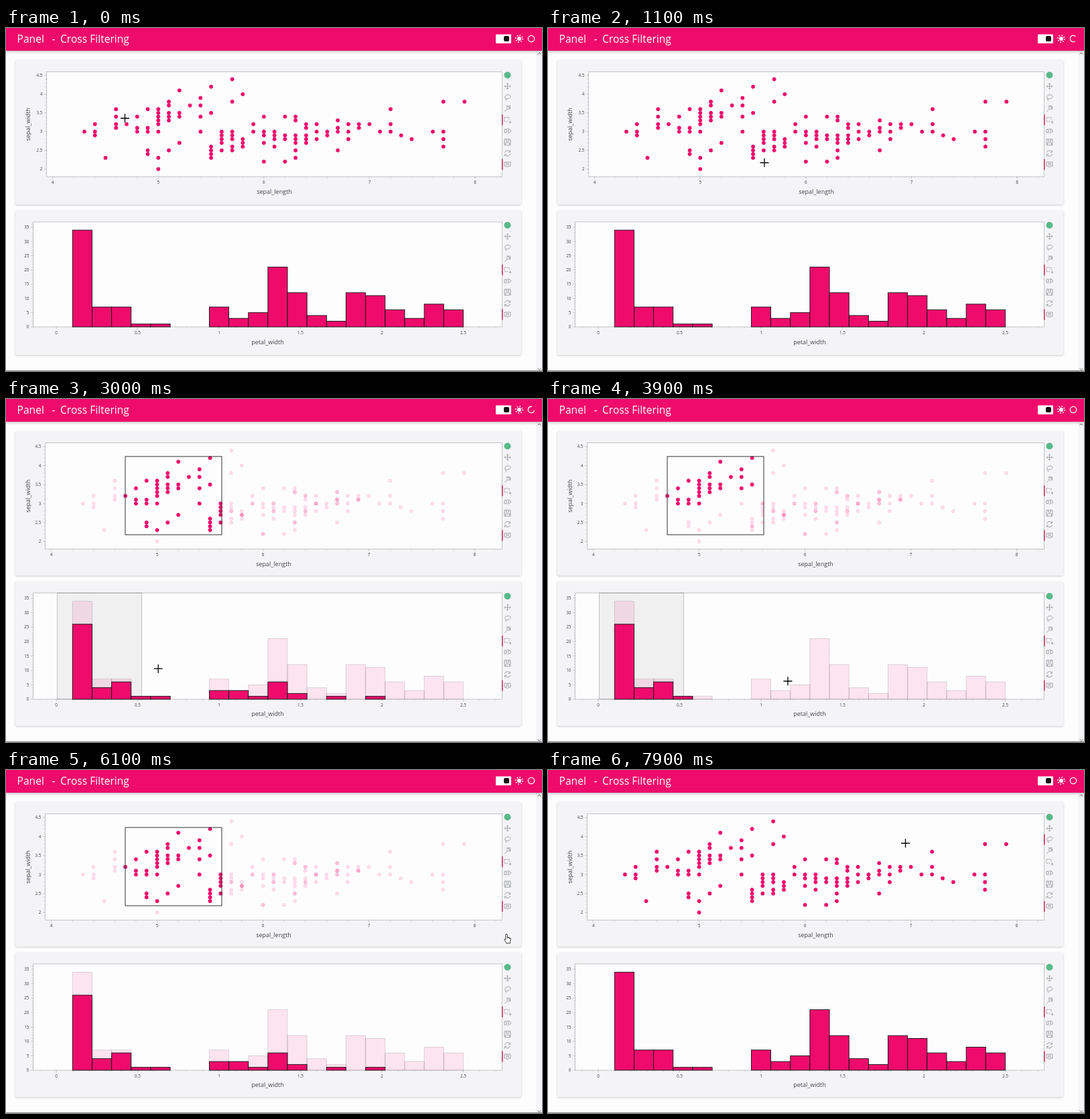
Animation, 800 px wide and 513 px high, one loop 8000 ms. Source, as an HTML page:

```html
<!DOCTYPE html>
<html lang="en">
<head>
<meta charset="utf-8">
<title>Cross Filtering</title>
<style>
html, body { margin: 0; width: 100%; height: 100%; overflow: hidden; background: #fdfdfe; }
svg { display: block; width: 800px; height: 513px; font-family: "Open Sans", "Noto Sans", sans-serif; }
.card { fill: #f4f3f6; filter: drop-shadow(0 1px 1.5px rgba(0, 0, 0, .2)); }
.tick { font-size: 6.4px; fill: #444; }
.label { font-size: 9px; fill: #444; text-anchor: middle; }
.axis { stroke: #c4c4c6; fill: none; }
.icon { stroke: #a3a5a8; fill: none; stroke-width: 1; }
</style>
</head>
<body>
<svg id="stage" viewBox="0 0 800 513">
  <rect width="800" height="513" fill="#fdfdfe"/>
  <rect x="791" y="34" width="9" height="479" fill="#f5f4f6"/>
  <path d="M793.5 39.5l2.5-2.5 2.5 2.5M793.5 509l2.5 2.5 2.5-2.5" fill="none" stroke="#666"/>
  <path d="M0 512.5H800" stroke="#8a8a8c"/>
  <rect width="800" height="34" fill="#ef0b6b" style="filter:drop-shadow(0 1px 2px rgba(0,0,0,.3))"/>
  <g font-size="15.6" fill="#fff">
    <text x="16.5" y="22">Panel</text><text x="68.5" y="22">-</text><text x="81" y="22">Cross Filtering</text>
  </g>
  <rect x="731" y="9.500" width="23" height="13.500" rx="1" fill="#fff"/>
  <rect x="743" y="12" width="8" height="8" rx="2" fill="#111"/>
  <circle cx="766" cy="16" r="3" fill="#fff"/>
  <circle cx="766" cy="16" r="5" fill="none" stroke="#fff" stroke-width="2" stroke-dasharray="1.4 2.527"/>
  <g id="busy"></g>
  <rect class="card" x="14" y="48" width="755" height="216" rx="2"/>
  <rect class="card" x="14" y="273" width="755" height="216" rx="2"/>
  <g id="plots"></g>
  <g id="tools"></g>
  <g id="pointer"></g>
</svg>
<script>
const PINK = '#ee0b6c';
const LOOP = 8000, STEP = 100;
const $ = id => document.getElementById(id);
const range = (a, b, s = 1) => Array.from({ length: Math.round((b - a) / s) + 1 }, (_, i) => a + i * s);
const within = (t, a, b) => t >= a && t < b;

// Sepal widths for each sepal length, in tenths, starting at 4.3.
const columns = [
  [30], [29, 30, 32], [23], [31, 32, 34, 36], [32], [30, 31, 34], [24, 25, 30, 31, 36],
  [20, 23, 30, ...range(32, 36)], [25, ...range(33, 35), 37, 38], [27, 34, 35, 41], [37],
  [30, 34, 37, 39], [...range(23, 26), 35, 42], [25, ...range(27, 30)],
  [25, 26, ...range(28, 30), 38, 44], [...range(26, 28), 40], [30, 32], [22, 27, 29, 30, 34],
  [26, ...range(28, 30)], [22, 28, 29, 34], [23, 25, ...range(27, 29), 33, 34],
  [...range(27, 29), 31, 32], [28, 30, 32], [29, 30], [25, 30, 31, 33], [28, 30, 32],
  [31, 32], [32], [30], [30, 32, 36], [29], [28], [], [30], [26, 28, 30, 38], [], [38]
];
const repeats = {
  2: '55,24 56,30 57,28 59,30 60,22 61,28 61,30 63,25 63,33 64,28 64,32 67,30 67,33',
  3: '65,30 67,31 69,31',
  4: '58,27'
};
const copies = key => +(Object.keys(repeats).find(n => repeats[n].split(' ').includes(key)) || 1);
const points = columns.flatMap((ys, i) => ys.map(y => ({ x: 43 + i, y, n: copies(`${43 + i},${y}`) })));

const counts = [34, 7, 7, 1, 1, 0, 0, 7, 3, 5, 21, 12, 4, 2, 12, 11, 6, 3, 8, 6];
const boxCounts = [26, 4, 6, 1, 1, 0, 0, 3, 3, 1, 6, 2, 0, 1, 0, 1, 0, 0, 0, 0];

const inBox = p => p.x >= 47 && p.x <= 56 && p.y >= 22 && p.y <= 42;
const inBoth = p => inBox(p) && (p.y > 30 || (p.y === 30 && p.x < 52));

// Pointer stops: time, x, y.
const stops = [
  [0, 177.5, 135], [300, 178, 86], [900, 322, 203], [1000, 323, 201.5], [1800, 323, 201.5],
  [2300, 77, 314], [2500, 77, 314], [2800, 203, 400], [3600, 358, 422], [4400, 358, 422],
  [5100, 747, 408], [5300, 747, 411], [5700, 747, 411], [6300, 747, 187], [6700, 747, 185],
  [6900, 749.5, 150], [7200, 747, 102], [7400, 747, 102], [7800, 533.5, 109.500], [8000, 533.5, 109.5]
];
function pointerAt(t) {
  const i = Math.max(1, stops.findIndex(s => s[0] > t));
  const [t0, x0, y0] = stops[i - 1], [t1, x1, y1] = stops[i];
  const u = (t - t0) / (t1 - t0), e = u * u * (3 - 2 * u);
  return [x0 + (x1 - x0) * e, y0 + (y1 - y0) * e];
}

const text = (cls, x, y, s, extra = '') => `<text class="${cls}" x="${x}" y="${y}" ${extra}>${s}</text>`;
const rect = (x0, y0, x1, y1, attrs) => `<rect x="${x0}" y="${y0}" width="${x1 - x0}" height="${y1 - y0}" ${attrs}/>`;
const DRAG = 'fill="#d3d3d3" fill-opacity=".5" stroke="#222" stroke-dasharray="3 3"';

function axes(f, xs, ys) {
  const { left, top, bottom } = f;
  let ticks = '', labels = '';
  for (const v of range(xs.from, xs.to, xs.minor)) ticks += `M${f.x(v)} ${bottom}v2`;
  for (const v of range(ys.from, ys.to, ys.minor)) ticks += `M${left} ${f.y(v)}h-2`;
  for (const v of xs.major) {
    ticks += `M${f.x(v)} ${bottom - 1}v4.500`;
    labels += text('tick', f.x(v), bottom + 10.8, v, 'text-anchor="middle"');
  }
  for (const v of ys.major) {
    ticks += `M${left + 1} ${f.y(v)}h-4.500`;
    labels += text('tick', left - 6, f.y(v) + 2.3, v, 'text-anchor="end"');
  }
  return `<path class="axis" stroke-width=".8" d="${ticks}"/>` + labels;
}
const frame = f => rect(f.left, f.top, 740.5, f.bottom, 'class="axis"');

function scatter(shifted, selected, drag, box) {
  const f = shifted
    ? { left: 58.5, top: 65.5, bottom: 224.5, x: v => 67.5 + (v - 4) * 158.05, y: v => 213.1 - (v - 2) * 56.8 }
    : { left: 60.5, top: 65.5, bottom: 222.5, x: v => 69.7 + (v - 4) * 157.6, y: v => 211 - (v - 2) * 56 };
  const dot = p => {
    const a = !selected || selected(p) ? 1 : 1 - .88 ** p.n;
    return `<circle cx="${f.x(p.x / 10)}" cy="${f.y(p.y / 10)}" r="2.6" fill="${PINK}" stroke="${PINK}" stroke-width=".8" fill-opacity="${a}" stroke-opacity="${a}"/>`;
  };
  const mid = f.bottom / 2 + 32.75;
  return rect(f.left, f.top, 740.5, f.bottom, 'fill="#fefdfe"')
    + axes(f, { from: 4, to: 8.2, minor: .2, major: range(4, 8) }, { from: 1.9, to: 4.5, minor: .1, major: range(2, 4.5, .5) })
    + frame(f) + points.map(dot).join('')
    + (box ? rect(178, 86, 322, 203, 'fill="none" stroke="#444" stroke-width="1.1"') : '')
    + (drag ? rect(178, 86, Math.max(178, drag[0]), Math.max(86, drag[1]), DRAG) : '')
    + text('label', shifted ? 399.5 : 400.5, f.bottom + 25, 'sepal_length')
    + text('label', 36, mid, 'sepal_width', `transform="rotate(-90 36 ${mid})"`);
}

function histogram(shifted, selected, drag, band) {
  const bottom = shifted ? 449 : 447;
  const f = { left: 40.5, top: 290, bottom, x: v => 75 + v * 243, y: v => bottom - v * (bottom - 298) / 35 };
  const bars = (list, attrs) => list.map((n, i) => n === null ? ''
    : rect(f.x(.1 + i * .12), f.y(n), f.x(.22 + i * .12), bottom, attrs)).join('');
  const solid = `fill="${PINK}" stroke="#111" stroke-width=".9"`;
  return rect(f.left, f.top, 740.5, bottom, 'fill="#fefdfe"')
    + axes(f, { from: -.1, to: 2.7, minor: .1, major: range(0, 2.5, .5) }, { from: 0, to: 36, minor: 1, major: range(0, 35, 5) })
    + frame(f)
    + (selected ? bars(counts, `fill="${PINK}" fill-opacity=".1" stroke="#000" stroke-opacity=".15" stroke-width=".9"`) : '')
    + (band ? rect(76.5, 290, 202.5, bottom, 'fill="#000" fill-opacity=".05" stroke="#000" stroke-opacity=".22"') : '')
    + bars(selected || counts, solid)
    + (drag ? rect(77, 290, Math.max(77, drag[0]), bottom, DRAG) : '')
    + text('label', 390.5, bottom + (shifted ? 25 : 26), 'petal_width');
}

const icons = [
  'M-4.500 0h9M0-4.500v9M-1.500-3L0-4.500 1.500-3M-1.500 3L0 4.500 1.500 3M-3-1.500L-4.500 0-3 1.500M3-1.500L4.500 0 3 1.500',
  'M-2 2C-6 0-3-4 1-4S6 0 2 1.500-3 1-3 2.500-1 3-2 5',
  'M-2-4H4V1.500M-4 4.500L-1 1M-1-1a2 2 0 1 0 4 0a2 2 0 1 0-4 0',
  'M-4.500-3.500h2m1 0h2m1 0h1v2m0 1v1M-4.500-3.500v2m0 1v2m0 1h2m1 0h2M2 3.500h4M4 1.500v4',
  'M-4.500-2.500h3v5h-3zM1 0a2 2 0 1 0 4 0a2 2 0 1 0-4 0M0 4l2-2.500M-1-3h4',
  'M-4.500-4.500h9v9h-9zM-2-4.500v3h4v-3M-3 4v-3h6v3',
  'M-4-1A4 4 0 0 1 3.500-2M4 1A4 4 0 0 1-3.500 2M4-4.500V-1.500H1.500M-4 4.500V1.500H-1.500',
  'M-4.500-3.500h9v6h-3L0 4.500-1.500 2.500h-3zM-2.500-1.500h5M-2.500.5h5'
];
const spot = i => 16.7 * i;
function toolbar(y, active) {
  const mark = i => rect(740, y + spot(i) - 8, 741.5, y + spot(i) + 8, 'fill="#c0254f"');
  return `<circle cx="748.5" cy="${y}" r="5" fill="#58b98b"/>`
    + icons.map((d, i) => `<path class="icon" transform="translate(748.5 ${y + spot(i + 1)})" d="${d}"/>`).join('')
    + mark(active) + mark(8);
}

const cross = '<path d="M-7 0H7M0-7V7" stroke="#fff" stroke-opacity=".6" stroke-width="2.500"/><path d="M-6.500 0H6.500M0-6.500V6.500" stroke="#000" stroke-width="1.3"/>';
const hand = '<path d="M-1.200 1Q0-.8 1.200 1V5l4.300 1Q6.500 6.500 6.300 8L5.500 11.500V14H-.5V12.500L-3.500 8.500Q-3.500 7-1.200 8.500Z" fill="#fff" stroke="#222" stroke-width=".9"/><path d="M1.200 5v2M3 5.500v2M4.800 6v2" stroke="#222" stroke-width=".7"/>';

const busyAt = t => within(t, 1000, 2000) || within(t, 2900, 3700) || within(t, 5500, 6100)
  || within(t, 6500, 6800) || within(t, 7000, 7200);

function draw(t) {
  const [px, py] = pointerAt(t);
  const shifted = t >= 1500;
  const pointFilter = within(t, 3600, 5700) ? inBoth : within(t, 1500, 6600) ? inBox : null;
  const barFilter = within(t, 3300, 5600) ? boxCounts.map((n, i) => i < 4 ? n : null)
    : within(t, 1800, 7000) ? boxCounts : null;

  $('plots').innerHTML =
    scatter(shifted, pointFilter, within(t, 300, 1000) && [px, py], within(t, 1900, 7100))
    + histogram(shifted, barFilter, within(t, 2500, 2900) && [px, py], within(t, 2900, 5600));
  $('tools').innerHTML = toolbar(70.500, t >= 7300 ? 2 : 4) + toolbar(295, 4);
  $('busy').innerHTML = `<circle cx="784" cy="16" r="4.700" fill="none" stroke="#fff" stroke-width="1.300"`
    + (busyAt(t) ? ` stroke-dasharray="21 8.530" transform="rotate(${52 + (t - 1100) * .36} 784 16)"/>` : '/>');
  $('pointer').innerHTML = `<g transform="translate(${px} ${py})">${px > 741 ? hand : cross}</g>`;
}

const start = performance.now();
let shown = -1;
function tick() {
  const t = Math.floor(((performance.now() - start) % LOOP) / STEP) * STEP;
  if (t !== shown) draw(shown = t);
  requestAnimationFrame(tick);
}
tick();
</script>
</body>
</html>
```
